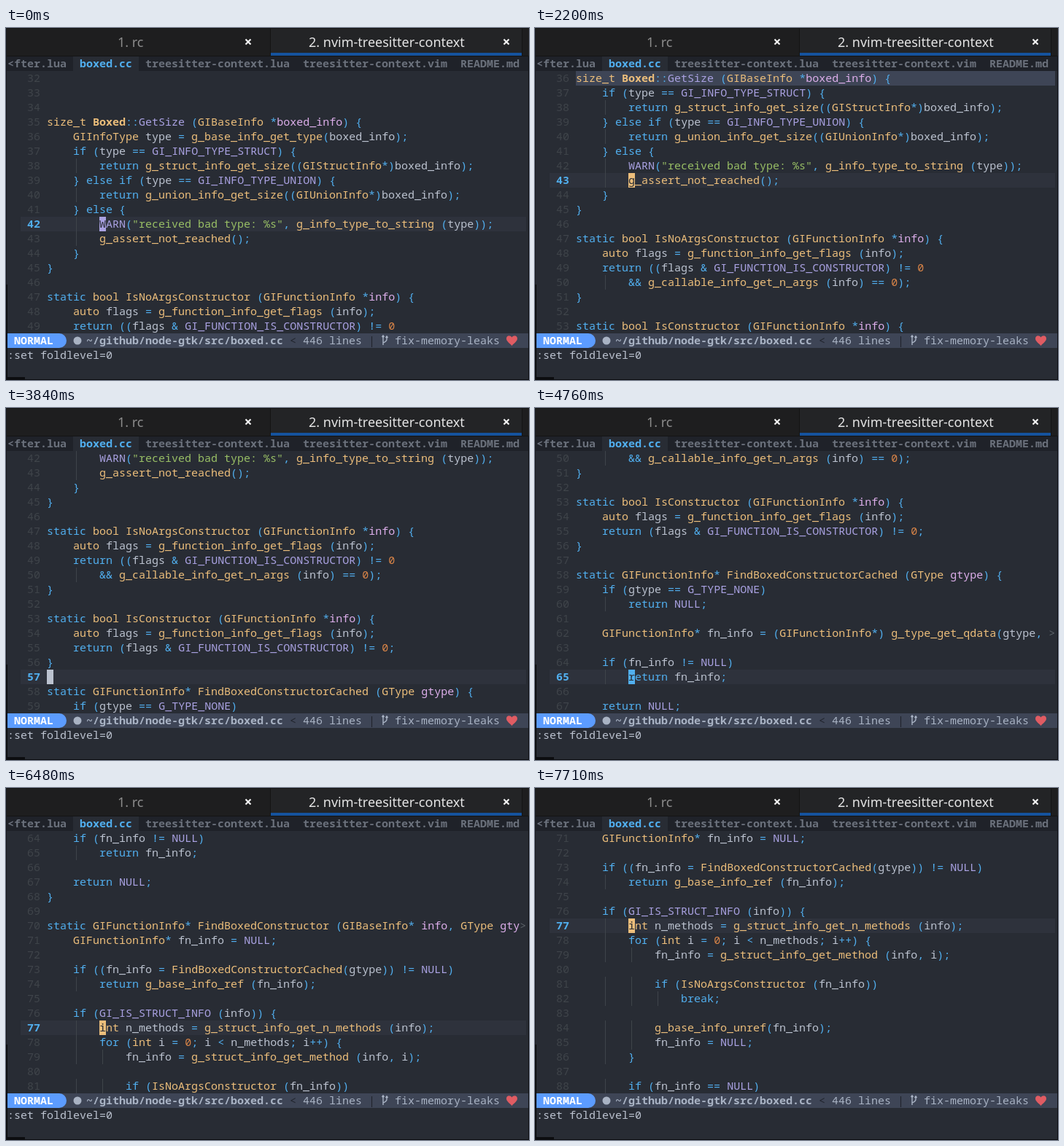
These frames come from a looping animation (717x483 px, 8 s). An HTML page:

```html
<!DOCTYPE html>
<html lang="en">
<head>
<meta charset="utf-8">
<title>Editor scrolling</title>
<style>
html, body { margin: 0; width: 100%; height: 100%; overflow: hidden; background: #282c34; }
#stage {
  position: relative; width: 717px; height: 483px; overflow: hidden; background: #282c34; color: #bbc2cf;
  font: 15px "Noto Sans Mono", "DejaVu Sans Mono", monospace; font-variant-ligatures: none;
}
#stage div, #stage svg { position: absolute; }
.row { left: 0; width: 717px; height: 20px; line-height: 18px; white-space: pre; }
.row > span { position: absolute; top: 0; }
.num { left: 29px; color: #3f444a; }
.src { left: 56px; }
.guide { top: 0; width: 1px; height: 20px; background: #3f444a; }
.here .num { color: #51afef; font-weight: 700; }
.key { color: #51afef; } .type { color: #ecbe7b; } .const { color: #a9a1e1; }
.str { color: #98be65; } .digit { color: #da8548; } .param { color: #dcaeea; }
.more { color: #5b6268; }
b { font-weight: 700; }
#view { left: 0; top: 59px; width: 717px; height: 360px; overflow: hidden; }
#code { left: 0; top: 0; }
#line { left: 20px; width: 693px; height: 20px; background: #2e323c; }
#cursor { width: 9px; height: 20px; line-height: 18px; color: #282c34; white-space: pre; }
#context { left: 56px; top: 0; width: 657px; height: 20px; background: #3e4556; overflow: hidden; }
#context .src { left: 0; }
#tabs { left: 0; top: 0; }
#files { top: 39px; background: #1f2229; color: #6b717c; font-weight: 700; }
#files .current { left: 92px; width: 90px; height: 20px; background: #282c34; color: #51afef; text-indent: 9px; }
#status { top: 419px; background: #3e4556; color: #a9b3c4; }
#mode { left: 2px; width: 81px; height: 20px; border-radius: 0 10px 10px 0; background: #5c9cff; color: #fff; font-weight: 700; text-indent: 9px; }
</style>
</head>
<body>
<div id="stage">
  <svg id="tabs" width="717" height="39" font-family="Noto Sans, Open Sans, sans-serif" font-size="18">
    <rect width="717" height="39" fill="#1e1e1f"/>
    <rect x="363" width="344" height="38" fill="#232426"/>
    <rect x="363" y="34" width="344" height="4" fill="#15539e"/>
    <path d="M0 .5H717M0 38.5H717M362.5 0V38M707.5 0V38" stroke="#141414"/>
    <text x="153" y="26" fill="#8c8c8c">1. rc</text>
    <text x="415" y="26" fill="#e4e4e4">2. nvim-treesitter-context</text>
    <path d="M328.5 15.5l7 7m0-7l-7 7M682.5 15.5l7 7m0-7l-7 7" stroke="#f2f2f2" stroke-width="2.2"/>
  </svg>

  <div id="files" class="row">
    <span style="left:2px">&lt;fter.lua</span>
    <span class="current">boxed.cc</span>
    <span style="left:191px">treesitter-context.lua</span>
    <span style="left:407px">treesitter-context.vim</span>
    <span style="left:623px">README.md</span>
  </div>

  <div id="view">
    <div id="line"></div>
    <div id="code"></div>
    <div id="cursor"></div>
    <div id="context"></div>
  </div>

  <div id="status" class="row">
    <span id="mode">NORMAL</span>
    <span style="left:110px"><b>~/github/node-gtk/src/boxed.cc</b></span>
    <span style="left:389px;color:#20242c">&lt;</span>
    <span style="left:407px">446 lines</span>
    <span style="left:497px;color:#20242c">|</span>
    <span style="left:533px">fix-memory-leaks</span>
    <svg width="717" height="20" style="left:0;top:0">
      <circle cx="98" cy="10" r="5.5" fill="#a9b3c4"/>
      <path d="M517 3v13M517 13q5-2 5-5v-3M515.5 5l1.5-2 1.5 2M520.5 6l1.5-2 1.5 2" fill="none" stroke="#a9b3c4" stroke-width="1.4"/>
      <path d="M693.500 17C690 13 686 11 686 7C686 2.500 691.500 2 693.500 5.500C695.500 2 701 2.500 701 7C701 11 697 13 693.500 17Z" fill="#e05c63"/>
    </svg>
  </div>
  <div class="row" style="top:439px"><span style="left:2px">:set foldlevel=0</span></div>

  <svg width="717" height="483" style="left:0;top:0">
    <path d="M0 352h2v131h-2zM0 479h26v4h-26zM0 482h717v1h-717zM716 39h1v444h-1z" fill="#0c0d10"/>
    <path d="M.5 0V352" stroke="#16181c"/>
  </svg>
</div>

<script>
const FIRST = 32, ROW = 20, COL = 9, GUTTER = 56, LOOP = 8000;
const source = `


size_t Boxed::GetSize (GIBaseInfo *boxed_info) {
    GIInfoType type = g_base_info_get_type(boxed_info);
    if (type == GI_INFO_TYPE_STRUCT) {
        return g_struct_info_get_size((GIStructInfo*)boxed_info);
    } else if (type == GI_INFO_TYPE_UNION) {
        return g_union_info_get_size((GIUnionInfo*)boxed_info);
    } else {
        WARN("received bad type: %s", g_info_type_to_string (type));
        g_assert_not_reached();
    }
}

static bool IsNoArgsConstructor (GIFunctionInfo *info) {
    auto flags = g_function_info_get_flags (info);
    return ((flags & GI_FUNCTION_IS_CONSTRUCTOR) != 0
        && g_callable_info_get_n_args (info) == 0);
}

static bool IsConstructor (GIFunctionInfo *info) {
    auto flags = g_function_info_get_flags (info);
    return (flags & GI_FUNCTION_IS_CONSTRUCTOR) != 0;
}

static GIFunctionInfo* FindBoxedConstructorCached (GType gtype) {
    if (gtype == G_TYPE_NONE)
        return NULL;

    GIFunctionInfo* fn_info = (GIFunctionInfo*) g_type_get_qdata(gtype, >

    if (fn_info != NULL)
        return fn_info;

    return NULL;
}

static GIFunctionInfo* FindBoxedConstructor (GIBaseInfo* info, GType gty>
    GIFunctionInfo* fn_info = NULL;

    if ((fn_info = FindBoxedConstructorCached(gtype)) != NULL)
        return g_base_info_ref (fn_info);

    if (GI_IS_STRUCT_INFO (info)) {
        int n_methods = g_struct_info_get_n_methods (info);
        for (int i = 0; i < n_methods; i++) {
            fn_info = g_struct_info_get_method (info, i);

            if (IsNoArgsConstructor (fn_info))
                break;

            g_base_info_unref(fn_info);
            fn_info = NULL;
        }

        if (fn_info == NULL)`.split('\n');

const $ = id => document.getElementById(id);

function add(parent, tag, className, text = '') {
  const el = document.createElement(tag);
  el.className = className;
  el.textContent = text;
  return parent.appendChild(el);
}

function kind(word, line, at) {
  const before = line.slice(0, at), after = line.slice(at + word.length);
  if (word === '>') return 'more';
  if (word[0] === '"') return 'str';
  if (/^\d/.test(word)) return 'digit';
  if (/^\W/.test(word)) return 'key';
  if (/^(static|if|else|return|for|break)$/.test(word)) return 'key';
  if (/^[A-Z_]+$/.test(word) || before.endsWith('::')) return 'const';
  if (/^(size_t|bool|auto|int|Boxed|GType|GI[A-Z][a-z]\w*)$/.test(word)) return 'type';
  if (/^\s*\(/.test(after)) return 'type';
  if (/^\w.*\(/.test(before)) return 'param';
  return '';
}

function highlight(parent, line) {
  const src = add(parent, 'span', 'src');
  for (const { 0: word, index } of line.matchAll(/\s+|"[^"]*"|\w+|[^\s\w"]+/g))
    add(src, word === 'Boxed' ? 'b' : 'span', word.trim() && kind(word, line, index), word);
}

const rows = source.map((line, i) => {
  const row = add($('code'), 'div', 'row');
  row.style.top = i * ROW + 'px';
  add(row, 'span', 'num', FIRST + i);
  highlight(row, line);
  const indent = line.search(/\S/);
  for (let col = 4; col < indent; col += 4)
    add(row, 'div', 'guide').style.left = GUTTER + col * COL + 4 + 'px';
  return row;
});
highlight(add($('context'), 'div', 'row'), source[3]);

// Key presses become a list of views; the cursor keeps two lines below it.
const views = [{ time: 0, top: 32, cursor: 42 }];
const last = () => views[views.length - 1];
const scroll = time => views.push({ ...last(), time, top: last().top + 1 });
const move = (time, cursor) =>
  views.push({ time, cursor, top: Math.max(last().top, cursor - 15) });
const hold = (time, step, count, from, rate) => {
  for (let k = 0; k < count; k++) move(time + k * step, from + Math.round(k * rate));
};

[720, 1160, 1390, 1660].forEach(scroll);
[2200, 2620, 2890, 3070].forEach((time, i) => move(time, 43 + i));
hold(3560, 41, 11, 47, 1.6);
move(4310, 64);
hold(4760, 40, 6, 65, 1.4);
[5130, 5300, 5470, 5650, 5820].forEach((time, i) => move(time, 73 + i));
[6220, 6480, 6660, 6830, 7000, 7170, 7350, 7530, 7710].forEach(scroll);

function charColor(row, col) {
  let end = 0;
  for (const token of row.querySelector('.src').children) {
    end += token.textContent.length;
    if (col < end) return getComputedStyle(token).color;
  }
  return '#bbc2cf';
}

let shown;
function show(view) {
  if (view === shown) return;
  shown = view;
  const { time, top, cursor } = view;
  const index = cursor - FIRST, line = source[index];
  const col = Math.min(8, Math.max(line.length - 1, 0));
  const y = (cursor - top) * ROW + 'px';
  $('code').style.top = (FIRST - top) * ROW + 'px';
  rows.forEach((row, i) => row.classList.toggle('here', i === index));
  $('line').style.top = y;
  Object.assign($('cursor').style, {
    top: y, left: GUTTER + col * COL + 'px', background: charColor(rows[index], col)
  });
  $('cursor').textContent = line[col] || '';
  $('context').style.display = time >= 2200 && time < 3070 ? 'block' : 'none';
}

const start = performance.now();
function frame() {
  const time = (performance.now() - start) % LOOP;
  show(views.findLast(view => view.time <= time));
  requestAnimationFrame(frame);
}
frame();
</script>
</body>
</html>
```
